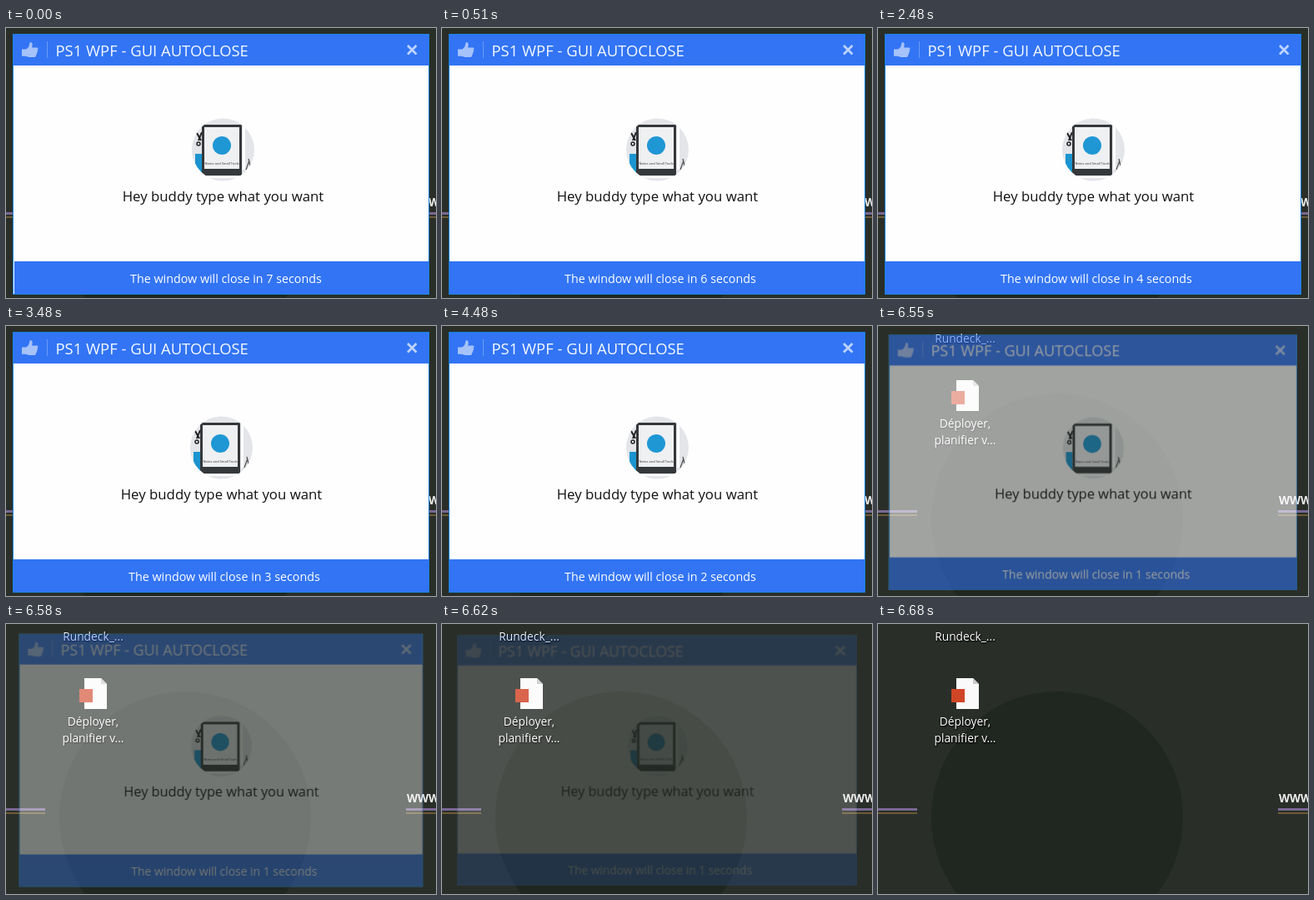
Animation, 516 px wide and 324 px high, one loop 6.75 s. Source, as an HTML page:

```html
<!DOCTYPE html>
<html lang="en">
<head>
<meta charset="utf-8">
<title>Window autoclose</title>
<style>
  @property --left { syntax: "<integer>"; inherits: false; initial-value: 7; }

  html, body { margin: 0; width: 100%; height: 100%; overflow: hidden; background: #292e29; }
  body { position: relative; font-family: "Open Sans", "Noto Sans", sans-serif; }
  .layer, .win, .content { position: absolute; left: 0; top: 0; width: 516px; height: 324px; }
  .layer { display: block; }
  .label { font-size: 13.8px; fill: #fff; text-anchor: middle; text-shadow: 1px 1px 2px #000, 0 1px 1px #000; }

  .win {
    clip-path: inset(7px 8px 4px 8px);
    transform-origin: 258px 163.5px;
    background: #fefefe;
    animation: close 6750ms step-end infinite;
  }
  .content { animation: slide 6750ms linear infinite; }
  .bar { position: absolute; left: 8px; width: 500px; background: #3274f4; }
  .head { top: 7px; height: 38px; }
  .foot { top: 280px; height: 40px; }
  .edge {
    position: absolute; left: 8px; top: 7px; width: 500px; height: 313px;
    box-sizing: border-box; border: 1px solid #1883de;
  }
  .text { position: absolute; white-space: pre; line-height: 40px; }
  .title { left: 59.5px; top: 7px; font-size: 18.45px; color: #f4f8ff; }
  .message { left: 0; width: 517px; top: 181.5px; font-size: 16.8px; text-align: center; color: #111; }
  .notice { left: 147px; top: 280.5px; font-size: 14.3px; color: #fff; }

  .count { counter-reset: left var(--left); animation: count 6750ms step-end infinite; }
  .count::after { content: counter(left); }

  @keyframes slide {
    0% { transform: translateX(2px); }
    .44% { transform: translateX(2px); animation-timing-function: ease-out; }
    4%, 100% { transform: none; }
  }
  @keyframes count {
    0% { --left: 7; }
    7.55% { --left: 6; }
    21.92% { --left: 5; }
    36.74% { --left: 4; }
    51.55% { --left: 3; }
    66.37% { --left: 2; }
    81.62%, 100% { --left: 1; }
  }
  @keyframes close {
    0% { opacity: 1; transform: none; }
    96.44% { opacity: .8; transform: scale(.99); }
    97.03% { opacity: .57; transform: scale(.98); }
    97.48% { opacity: .37; transform: scale(.97); }
    98.07% { opacity: .18; transform: scale(.96); }
    98.51% { opacity: .05; transform: scale(.952); }
    98.96%, 100% { opacity: 0; transform: scale(.95); }
  }
</style>
</head>
<body>
  <!-- Desktop -->
  <svg class="layer" viewBox="0 0 516 324">
    <rect width="516" height="324" fill="#292e29"/>
    <circle cx="215" cy="232" r="151" fill="#202620"/>
    <path d="M0 222.5H47M480 222.5H516" stroke="#796793" stroke-width="3"/>
    <path d="M0 227H47M480 227H516" stroke="#6d5c37" stroke-width="2"/>
    <text x="481" y="214" font-size="13.500" font-weight="700" fill="#eee">WWW</text>
    <path d="M94 65h20l7 7v30H94z" fill="#fafafa"/>
    <path d="M114 65v7h7z" fill="#c9c9c9"/>
    <rect x="88" y="78" width="16" height="16" fill="#d04526"/>
    <g class="label">
      <text x="104.5" y="20">Rundeck_...</text>
      <text x="104.5" y="122">Déployer,</text>
      <text x="104.5" y="142">planifier v...</text>
    </g>
  </svg>

  <div class="win">
    <div class="content">
      <svg class="layer" viewBox="0 0 516 324">
        <clipPath id="round"><circle cx="258.5" cy="146" r="37.5"/></clipPath>
        <g clip-path="url(#round)">
          <rect x="221" y="108" width="75" height="76" fill="#e3e5e9"/>
          <path d="M282 118h3v52h-3z" fill="#fff"/>
          <path d="M227 126l5 9M233 125l-4 10" stroke="#222" stroke-width="2"/>
          <circle cx="229" cy="139" r="2" fill="none" stroke="#222" stroke-width="1.5"/>
          <rect x="225" y="151" width="8" height="24" fill="#1b94d0"/>
          <path d="M286 170l4-11M289 157l3 12" stroke="#555" stroke-width="1.3"/>
          <rect x="233" y="116" width="48" height="61" rx="1.5" fill="#35383b"/>
          <rect x="236" y="119" width="42" height="50" fill="#eff0f2"/>
          <circle cx="257" cy="141" r="11" fill="#1f97d4"/>
          <text x="257" y="164" font-size="4" text-anchor="middle" fill="#333">Notes and Small Tools</text>
          <rect x="229" y="178" width="59" height="2" fill="#fff"/>
        </g>
      </svg>
      <div class="text message">Hey buddy type what you want</div>
      <div class="bar foot"></div>
      <div class="text notice">The window will close in <span class="count"></span> seconds</div>
    </div>
    <div class="bar head"></div>
    <svg class="layer" viewBox="0 0 516 324">
      <path fill="#a5c2fa" d="M19 25.5h5c3-1.5 4-4 4.5-8 3-1 4 2 2.5 6h6c2 0 2 2.5.5 3 1 1 .5 2.5-.5 3 .5 1 0 2.5-1 2.7.3 1.5-.5 2.8-2 2.8h-6c-2.5 0-3-1.2-5-1.2h-4z"/>
      <path d="M49.5 16V36" stroke="#6b9bf7"/>
      <path d="M482 21l10.5 10.5M492.5 21L482 31.5" stroke="#bcd2fc" stroke-width="2.8"/>
    </svg>
    <div class="text title">PS1 WPF - GUI AUTOCLOSE</div>
    <div class="edge"></div>
  </div>
</body>
</html>
```
